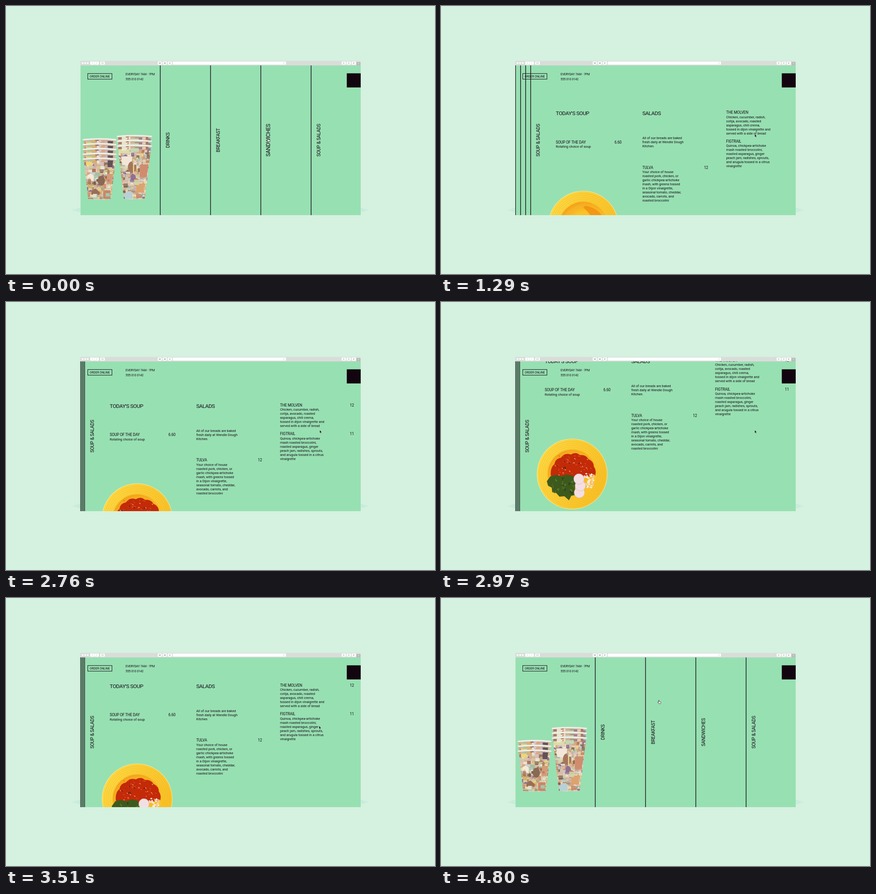
These frames come from a looping animation (947x592 px, 4.83 s). An HTML page:

```html
<!DOCTYPE html>
<html lang="en">
<head>
<meta charset="utf-8">
<title>Cafe menu</title>
<style>
  html, body { margin: 0; width: 100%; height: 100%; overflow: hidden; background: #d5f1df; }
  svg { display: block; width: 947px; height: 592px; }
  text { font-family: Roboto, "Open Sans", sans-serif; fill: #140a14; }
  .head { font-size: 11.8px; letter-spacing: -.45px; }
  .item { font-size: 8.4px; letter-spacing: -.2px; }
  .body { font-size: 7.35px; }
  .small { font-size: 6.55px; letter-spacing: -.05px; }
  .tab { font-size: 10.4px; letter-spacing: -.35px; text-anchor: middle; }
  .end { text-anchor: end; }
</style>
</head>
<body>
<svg id="stage" viewBox="0 0 947 592">
  <defs>
    <clipPath id="page"><rect x="164" y="131" width="619" height="331"/></clipPath>
    <radialGradient id="bowl" cx=".58" cy=".6" r=".6">
      <stop offset="0" stop-color="#f7b21f"/>
      <stop offset=".65" stop-color="#fbc426"/>
      <stop offset="1" stop-color="#f4a51b"/>
    </radialGradient>
    <linearGradient id="glaze" x1="0" x2="1" y1="0" y2=".4">
      <stop offset="0" stop-color="#ffdb45"/>
      <stop offset="1" stop-color="#f9c026"/>
    </linearGradient>
  </defs>
  <path d="M164 445l-18 6 18 5zM783 445l18 6-18 5z" fill="#c9ecdc"/>
  <rect x="164.5" y="131" width="618.5" height="331" fill="#97e0b2"/>
  <g clip-path="url(#page)">
    <g id="cups"></g>
    <g id="panels"></g>
    <g id="content"></g>
    <g id="header"></g>
  </g>
  <rect x="752.3" y="148.7" width="30.7" height="31.2" fill="#12050f"/>
  <g id="chrome"></g>
  <g id="arrow">
    <path d="M-2-4V3.2L-.4 1.8 .7 4.2 1.8 3.7.8 1.4H2.7z" fill="#160c14" stroke="#e8f7ee" stroke-width=".5"/>
  </g>
  <g id="hand">
    <path d="M-1.5 4L-3.7.6Q-3.4-.5-2.2.5L-1.8 1V-3.4Q-1.2-4.4-.5-3.4V-1Q.4-1.6 .9-.7 1.9-1.2 2.2-.3 3.3-.6 3.4.5V2L2.6 4z"
      fill="#e6f3ea" stroke="#3b3038" stroke-width=".8"/>
  </g>
</svg>
<script>
const LOOP = 4830;
const INK = '#140a14';
const byId = id => document.getElementById(id);

function add(parent, tag, attrs = {}, label) {
  const el = document.createElementNS('http://www.w3.org/2000/svg', tag);
  for (const key in attrs) el.setAttribute(key, attrs[key]);
  if (label !== undefined) el.textContent = label;
  parent.appendChild(el);
  return el;
}

const SIZES = { head: 11.8, item: 8.4, body: 7.35, small: 6.55, tab: 10.4 };
// Places text by the middle of its capitals.
function write(parent, x, middle, style, label, end = '') {
  return add(parent, 'text', { x, y: middle + SIZES[style] * .355, class: `${style} ${end}` }, label);
}

function seeded(seed) {
  return () => (seed = (seed * 16807) % 2147483647) / 2147483647;
}

// Browser bar
function buildChrome() {
  const g = byId('chrome');
  add(g, 'rect', { x: 164, y: 121.5, width: 619, height: 9.7, rx: 1.5, fill: '#dadcda' });
  for (const x of [169, 174.7, 180.4]) add(g, 'circle', { cx: x, cy: 126, r: 2, fill: '#fff' });
  const pill = (x, width) => add(g, 'rect', { x, y: 122.8, width, height: 6.6, rx: 1, fill: '#fff' });
  [186, 195.7, 335, 346, 357, 741, 752, 763].forEach(x => pill(x, 9.2));
  pill(208, 10);
  pill(368, 250);
  add(g, 'path', {
    d: 'M191.5 124.7l-1.4 1.4 1.4 1.4M199.5 124.7l1.4 1.4-1.4 1.4M211 124.7h4v2.8h-4z' +
       'M744.5 124.8h2v2.6h-2zM755.3 124.8h2.6v2.6h-2.6z', fill: 'none', stroke: '#b4b4b4', 'stroke-width': .7
  });
  for (const x of [337.5, 348.5]) add(g, 'rect', { x, y: 125, width: 4.2, height: 2.2, fill: '#a9a9a9' });
  for (const x of [361.6, 767.6]) add(g, 'circle', { cx: x, cy: 126.1, r: 1.4, fill: '#a9a9a9' });
  add(g, 'circle', { cx: 613.5, cy: 126.1, r: 1.2, fill: 'none', stroke: '#ccc', 'stroke-width': .6 });
  add(g, 'rect', { x: 774, y: 124, width: 8.5, height: 7.2, fill: '#b7b8b7' });
  add(g, 'path', { d: 'M776.5 127.6h3.4M778.2 125.9v3.4', stroke: '#eee', 'stroke-width': .7 });
}

function buildHeader() {
  const g = byId('header');
  add(g, 'rect', { x: 180.5, y: 149.2, width: 53.4, height: 12.4, fill: 'none', stroke: INK });
  write(g, 184.8, 155.6, 'small', 'ORDER ONLINE');
  write(g, 264, 150.8, 'small', 'EVERYDAY 7AM - 7PM');
  write(g, 264, 161.4, 'small', '555 010 0142');
}

// Paper cups printed with a patchwork town
const TOWN = ['#d3a077', '#a76a4a', '#e6d07c', '#dcb3a2', '#efe7d6', '#7d5a86', '#c5795a', '#92b9a4',
  '#dcc3a0', '#6b4f3c', '#d6a95a', '#cfb3bd', '#b99a7c', '#b4c9cf', '#ece0cc', '#c9d3a0'];

// The larger buildings and figures, as [colour, outline]
const LEFT_SIGHTS = [
  ['#efd468', 'M-30 7h13v8h-13z'], ['#4f3c44', 'M18 4h12l-2 15h-10z'], ['#f3ead8', 'M-27 37l7-4 7 4v13h-14z'],
  ['#7b5843', 'M4 38a8 11 0 0 1 0 22a8 11 0 0 1 0-22z'], ['#d0906c', 'M16 34h14l-4 22h-10z'],
  ['#8c5f42', 'M-18 74l9-8 9 8v6h-18z'], ['#c47a58', 'M8 70h16v19h-16z'], ['#a3c3bd', 'M-14 78h9v11h-9z']
];
const RIGHT_SIGHTS = [
  ['#d9dca0', 'M-35 8h24v9h-24z'], ['#b9d6b0', 'M-8 6h18v8h-18z'], ['#f1e6d8', 'M-29 24h24v19h-22z'],
  ['#9a6649', 'M-5 35a9 12 0 0 1 0 25a9 12 0 0 1 0-25z'], ['#ecd78c', 'M-3 30h2.5v42h-2.5z'],
  ['#cb7f60', 'M12 42h19l-4 28h-15z'], ['#80608c', 'M-8 66l5-4 5 4 3 10h-13z'],
  ['#d99a62', 'M4 84h20l-3 20h-17z'], ['#b0cdd6', 'M-21 118v-12q8-11 17 0v12z']
];

function buildCup({ id, x, y, rim, foot, height, seed, sights }) {
  const random = seeded(seed);
  const pick = () => TOWN[Math.floor(random() * TOWN.length)];
  const outline = `M${1.5 - rim} 0H${rim - 1.5}L${foot} ${height - 1}Q0 ${height + 2} ${-foot} ${height - 1}z`;
  const defs = document.querySelector('defs');
  add(add(defs, 'clipPath', { id: id + 'Clip' }), 'path', { d: outline });
  const cup = add(defs, 'g', { id });
  const print = add(cup, 'g', { 'clip-path': `url(#${id}Clip)` });
  add(print, 'path', { d: outline, fill: '#cfae90' });

  const house = (left, top, w, h) => {
    add(print, 'rect', { x: left, y: top, width: w, height: h, fill: pick() });
    if (random() < .5) add(print, 'path', { d: `M${left - 1} ${top}l${w / 2 + 1}-4 ${w / 2 + 1} 4z`, fill: pick() });
    add(print, 'path', {
      d: `M${left + 1} ${top + 2}h${w - 2}M${left + 1} ${top + 4.5}h${w - 2}`,
      stroke: pick(), 'stroke-width': 1.1, 'stroke-dasharray': '1.3 1.2'
    });
  };
  const fill = (step, chance) => {
    for (let row = 0; row < height; row += step) {
      for (let left = -rim; left < rim;) {
        const w = 3 + random() * 8;
        if (random() < chance) house(left, row + random() * 4, w, 4 + random() * 8);
        left += w;
      }
    }
  };
  fill(7, 1);
  sights.forEach(([color, d]) => add(print, 'path', { d, fill: color }));
  fill(15, .28);
  add(print, 'path', { d: outline, fill: '#efe2d6', opacity: .12 });
  add(print, 'path', { d: `M${-foot} ${height}Q0 ${height + 2} ${foot} ${height}`, fill: 'none', stroke: '#ece6d6', 'stroke-width': 2 });

  const lip = `M${1.2 - rim} 1.2Q0 -2.6 ${rim - 1.2} 1.2`;
  add(cup, 'path', { d: lip, fill: 'none', stroke: '#cfd6c8', 'stroke-width': 3.8, 'stroke-linecap': 'round' });
  add(cup, 'path', { d: lip, fill: 'none', stroke: '#f1f2ea', 'stroke-width': 2.6, 'stroke-linecap': 'round' });
  const stack = [];
  for (let i = 4; i >= 0; i--) {
    stack[i] = add(byId('cups'), 'use', { href: '#' + id, x, y: y - i * 10.7 });
  }
  return stack;
}

function buildPanel(label) {
  const g = add(byId('panels'), 'g');
  add(g, 'rect', { x: 0, y: 131, width: 640, height: 331, fill: '#97e0b2' });
  add(g, 'path', { d: 'M0 131V462', stroke: INK, 'stroke-width': 1.4 });
  const title = add(g, 'g');
  write(title, 0, 0, 'tab', label);
  return { g, title };
}

// Plate of soup, centred on its own origin
function buildPlate(parent) {
  const random = seeded(77);
  const g = add(parent, 'g', { transform: 'translate(289.5 501)' });
  const disc = (r, fill) => add(g, 'circle', { r, fill });
  disc(78, '#f6e9a4');
  disc(77, 'url(#glaze)');
  for (let r = 56; r < 76; r += 4) {
    add(g, 'circle', { r, fill: 'none', stroke: '#e9b224', 'stroke-width': .7, opacity: .75 });
  }
  disc(54, 'url(#bowl)');
  const empty = add(g, 'g');
  add(empty, 'path', { d: 'M-6-46Q46-44 52 8L30 14Q28-20-6-46z', fill: '#f28c12', opacity: .8 });
  add(empty, 'path', { d: 'M-44-18Q-30-46 6-48L0-40Q-26-38-44-18z', fill: '#f7b52a', opacity: .8 });

  const soup = add(g, 'g');
  add(soup, 'circle', { r: 53, fill: '#c3260b' });
  for (let i = 0; i < 16; i++) {
    add(soup, 'circle', { cx: random() * 60 - 30, cy: random() * 20 - 47, r: .5, fill: '#ea7a3a' });
  }

  const meal = add(g, 'g');
  add(meal, 'path', {
    d: 'M-47 4Q-49-14-39-22-37-34-25-36-16-48-3-43 8-50 17-42 31-43 36-33 48-28 48-16 54-8 51 3L20 8-20 12z',
    fill: '#c32a08'
  });
  for (let i = 0; i < 46; i++) {
    const x = random() * 82 - 40, y = random() * 42 - 40;
    add(meal, 'path', {
      d: `M${x} ${y}q${random() * 3} -2 ${1 + random() * 3} ${random() * 2}`, fill: 'none',
      stroke: i % 3 ? '#e8542a' : '#f2b48a', 'stroke-width': 1.1
    });
  }
  for (let i = 0; i < 7; i++) {
    add(meal, 'circle', { cx: -34 + random() * 60, cy: -34 + random() * 22, r: 1.3, fill: '#4a2a12' });
  }
  add(meal, 'path', {
    d: 'M-56 16L-48 5-36 2-24 5-12 1 2 4 8 18 6 32 9 46-2 48-7 58-17 49-28 50-35 42-44 40-45 30-53 26z',
    fill: '#3d5a1c'
  });
  for (let i = 0; i < 26; i++) {
    const x = -46 + random() * 46, y = 7 + random() * 34;
    add(meal, 'path', {
      d: `M${x} ${y}l${2 + random() * 6} ${random() * 5 - 3} ${-1 - random() * 3} 6z`,
      fill: ['#29401a', '#587a2b', '#4c6b22'][i % 3]
    });
  }
  for (let i = 0; i < 52; i++) {
    add(meal, 'ellipse', {
      cx: 27 + random() * 21, cy: -2 + random() * 32, rx: 2.2, ry: 1.5,
      fill: ['#f7e3d2', '#eec7ac', '#fdf3ea'][i % 3]
    });
  }
  for (const [cx, cy] of [[16, 41], [18, 26], [15, 11]]) {
    add(meal, 'circle', { cx, cy, r: 11.5, fill: '#f3dfe2', stroke: '#d9b5bf', 'stroke-width': .7 });
  }
  return { empty, soup, meal };
}

function paragraph(g, x, top, copy) {
  copy.split('|').forEach((line, i) => write(g, x, top + i * 9, 'body', line));
}

function dish(g, x, top, name, copy, priceX, price) {
  write(g, x, top, 'item', name);
  write(g, priceX, top, 'item', price, 'end');
  paragraph(g, x, top + 9.9, copy);
}

function buildContent() {
  const g = byId('content');
  const plate = buildPlate(g);
  write(g, 229, 251.8, 'head', "TODAY'S SOUP");
  write(g, 420, 251.8, 'head', 'SALADS');
  dish(g, 229, 315.4, 'SOUP OF THE DAY', 'Rotating choice of soup', 374, '6.60');
  paragraph(g, 420, 306.5, 'All of our breads are baked|fresh daily at Wendle Dough|Kitchen.');
  dish(g, 420, 371.6, 'TULVA', 'Your choice of house|roasted pork, chicken, or|garlic chickpea-artichoke|' +
    'mash, with greens tossed|in a Dijon vinaigrette,|seasonal tomato, cheddar,|avocado, carrots, and|roasted broccolini', 565, '12');
  dish(g, 605, 249.8, 'THE MOLVEN', 'Chicken, cucumber, radish,|cotija, avocado, roasted|asparagus, chili crema,|' +
    'tossed in dijon vinaigrette and|served with a side of bread', 768, '12');
  dish(g, 605, 313.6, 'FIGTRAIL', 'Quinoa, chickpea-artichoke|mash roasted broccolini,|roasted asparagus, ginger|' +
    'peach jam, radishes, sprouts,|and arugula tossed in a citrus|vinaigrette', 768, '11');
  return plate;
}

buildChrome();
buildHeader();
const leftCups = buildCup({
  id: 'cupLeft', x: 206.5, y: 337, rim: 37, foot: 25, height: 90, seed: 4211, sights: LEFT_SIGHTS
});
const rightCups = buildCup({
  id: 'cupRight', x: 283.4, y: 308.3, rim: 38.5, foot: 23, height: 118.5, seed: 907, sights: RIGHT_SIGHTS
});
const panels = ['DRINKS', 'BREAKFAST', 'SANDWICHES', 'SOUP & SALADS'].map(buildPanel);
const plate = buildContent();

const clamp = v => Math.max(0, Math.min(1, v));
const span = (t, from, to) => clamp((t - from) / (to - from));
const inOut = p => p < .5 ? 4 * p ** 3 : 1 - 4 * (1 - p) ** 3;
const out = p => 1 - (1 - p) ** 3;
const ramp = (t, from, to) => inOut(span(t, from, to));
const show = (el, on) => el.setAttribute('display', on ? 'inline' : 'none');
const move = (el, x, y, rest = '') => el.setAttribute('transform', `translate(${x} ${y}) ${rest}`);

function render(t) {
  // 1 = home layout, 0 = section open
  const lead = 1 - ramp(t, 850, 1080) + ramp(t, 4330, 4720);
  const spread = 1 - ramp(t, 850, 1451) + ramp(t, 4270, 4710);
  const first = 164.5 + 176 * lead;
  const gap = 3 + 108 * spread;
  const hover = [0, 0, 1 - ramp(t, 380, 540), ramp(t, 440, 700) - ramp(t, 850, 1050)];
  panels.forEach(({ g, title }, i) => {
    move(g, first + gap * i, 0);
    move(title, 16.6, 296.5, `rotate(-90) scale(${1 + .16 * hover[i]})`);
  });

  const scroll = 161 * (ramp(t, 2515, 3270) - out(span(t, 3330, 3950)));
  const content = byId('content');
  move(content, first + gap * 3 - 173.5, -195 * spread - scroll);
  content.setAttribute('opacity', clamp((.6 - spread) / .35));
  show(plate.empty, t < 1710);
  show(plate.soup, (t >= 1710 && t < 1920) || t >= 3990);
  show(plate.meal, t >= 1920 && t < 3990);

  const leftCount = t < 2000 ? 5 : 3;
  const rightCount = t > 2000 || t < 210 ? 3 : t < 420 ? 4 : 5;
  leftCups.forEach((cup, i) => show(cup, i < leftCount));
  rightCups.forEach((cup, i) => show(cup, i < rightCount));

  const across = ramp(t, 30, 555), settle = ramp(t, 700, 900), away = ramp(t, 3450, 3960);
  const x = 579.5 + 122 * across - 7 * settle - 212.5 * away;
  const y = 296 - 9.5 * across - 57 * away;
  const pointing = spread > .6;
  show(byId('hand'), pointing);
  show(byId('arrow'), !pointing);
  move(byId(pointing ? 'hand' : 'arrow'), x, y);
}

const begin = performance.now();
function tick() {
  render((performance.now() - begin) % LOOP);
  requestAnimationFrame(tick);
}
tick();
</script>
</body>
</html>
```
